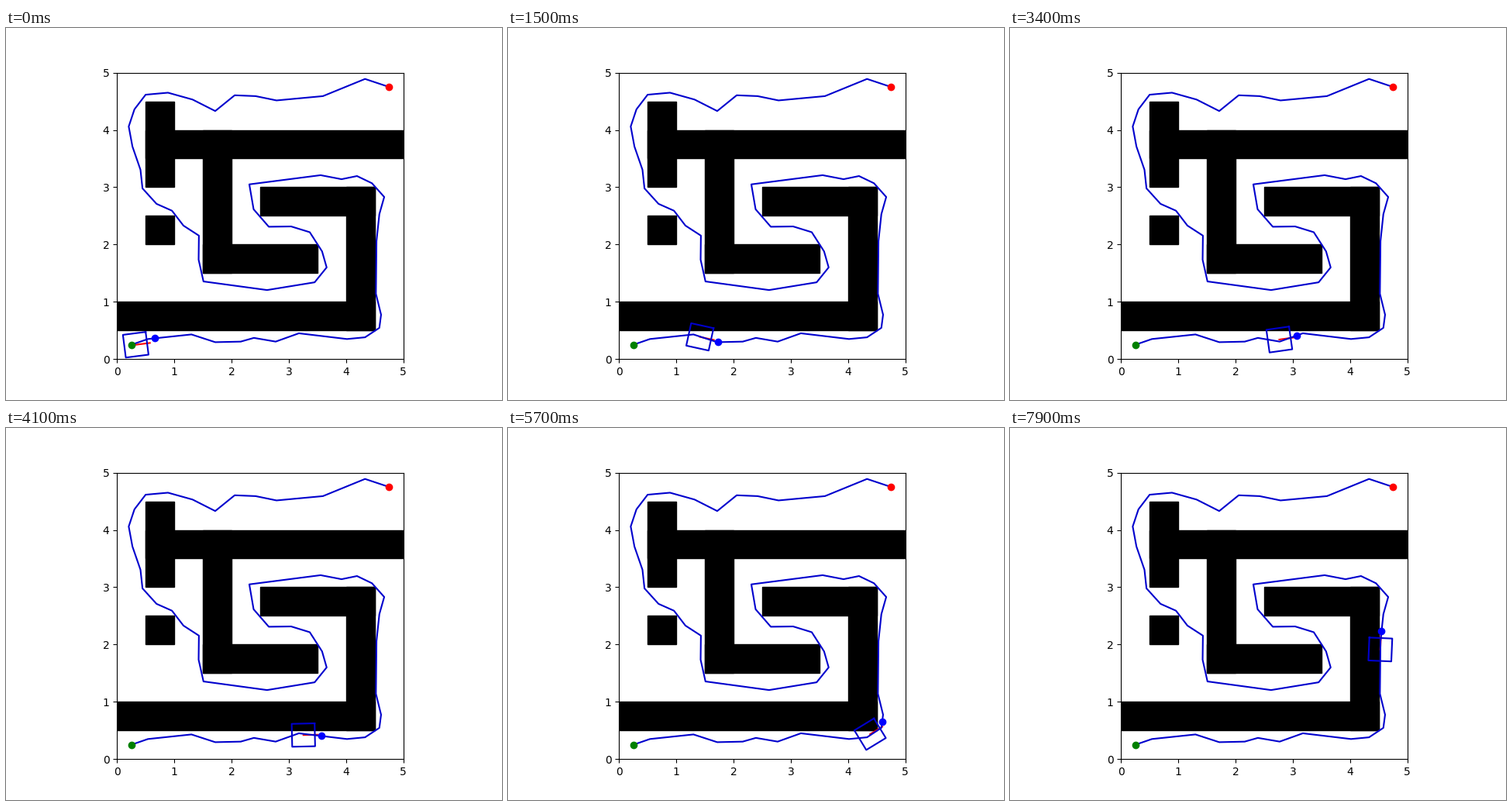
A matplotlib script for the animation above (8000 ms loop, 640 by 480 pixels).

```python
import numpy as np
import matplotlib.pyplot as plt
from matplotlib.animation import FuncAnimation
from matplotlib.patches import Rectangle

FRAMES, INTERVAL = 80, 100
START, GOAL = (0.25, 0.25), (4.75, 4.75)
BLUE = "#0000cd"
SPEED, LEAD = 0.0728, 0.4225      # target speed per frame, initial head start
DRIVE_GAIN, TURN_GAIN = 0.1835, 0.47

# Centre lines of the walls, each WALL units thick
WALL = 0.5
CENTRES = [
    [(0.25, 0.75), (4.25, 0.75), (4.25, 2.75), (2.75, 2.75)],
    [(3.25, 1.75), (1.75, 1.75), (1.75, 3.75)],
    [(4.75, 3.75), (0.75, 3.75)],
    [(0.75, 3.25), (0.75, 4.25)],
    [(0.75, 2.25), (0.75, 2.25)],
]

# Corners of the planned route
path = np.array([
    START, (0.54, 0.35), (1.3, 0.43), (1.715, 0.295), (2.16, 0.305),
    (2.39, 0.37), (2.77, 0.305), (3.175, 0.45), (4.015, 0.35), (4.33, 0.38),
    (4.58, 0.545), (4.61, 0.775), (4.52, 1.14), (4.53, 2.06), (4.58, 2.53),
    (4.665, 2.83), (4.45, 3.07), (4.19, 3.195), (3.92, 3.14), (3.555, 3.21),
    (2.31, 3.05), (2.385, 2.615), (2.65, 2.31), (3.04, 2.315), (3.365, 2.215),
    (3.58, 1.88), (3.66, 1.6), (3.45, 1.34), (2.62, 1.205), (1.51, 1.355),
    (1.425, 1.735), (1.43, 2.155), (1.16, 2.33), (0.96, 2.59), (0.69, 2.71),
    (0.445, 2.98), (0.41, 3.305), (0.27, 3.71), (0.205, 4.06), (0.305, 4.36),
    (0.5, 4.615), (0.89, 4.65), (1.32, 4.53), (1.715, 4.33), (2.055, 4.605),
    (2.42, 4.59), (2.785, 4.515), (3.595, 4.59), (4.33, 4.89), GOAL,
])
arc = np.r_[0, np.cumsum(np.hypot(*np.diff(path, axis=0).T))]


def direction(angle):
    return np.array([np.cos(angle), np.sin(angle)])


def target_at(n):
    s = LEAD + SPEED * n
    return np.array([np.interp(s, arc, axis) for axis in path.T])


def drive():
    """Chase the moving target; return a list of (position, heading, target)."""
    pos, heading, poses = np.array(START), 0.0, []
    for n in range(FRAMES):
        target = target_at(n)
        dx, dy = target - pos
        error = np.arctan2(dy, dx) - heading
        error = np.arctan2(np.sin(error), np.cos(error))
        pos = pos + DRIVE_GAIN * np.hypot(dx, dy) * direction(heading)
        heading += TURN_GAIN * error
        poses.append((pos, heading, target))
    return poses


def draw_wall(ax, a, b):
    low = np.minimum(a, b) - WALL / 2
    width, height = np.abs(np.subtract(a, b)) + WALL
    ax.add_patch(Rectangle(low, width, height, color="black"))


poses = drive()
corners = np.pi / 4 + np.pi / 2 * np.arange(5)

fig, ax = plt.subplots(figsize=(6.4, 4.8), dpi=100)
ax.set(xlim=(0, 5), ylim=(0, 5), xticks=range(6), yticks=range(6), aspect="equal")

for line in CENTRES:
    for a, b in zip(line, line[1:]):
        draw_wall(ax, a, b)

nose, = ax.plot([], [], color="red")
body, = ax.plot([], [], color=BLUE)
ax.plot(*path.T, color=BLUE)
ax.plot(*START, "o", color="green")
ax.plot(*GOAL, "o", color="red")
dot, = ax.plot([], [], "o", color="blue")


def update(n):
    pos, heading, target = poses[n]
    x, y = pos
    body.set_data(*(pos[:, None] + 0.2 * np.sqrt(2) * direction(heading + corners)))
    dx, dy = 0.25 * direction(heading)
    nose.set_data([x, x + dx], [y, y + dy])
    dot.set_data(target[:1], target[1:])
    return nose, body, dot


anim = FuncAnimation(fig, update, frames=FRAMES, interval=INTERVAL,
                     repeat=True, repeat_delay=0)
plt.show()
```
